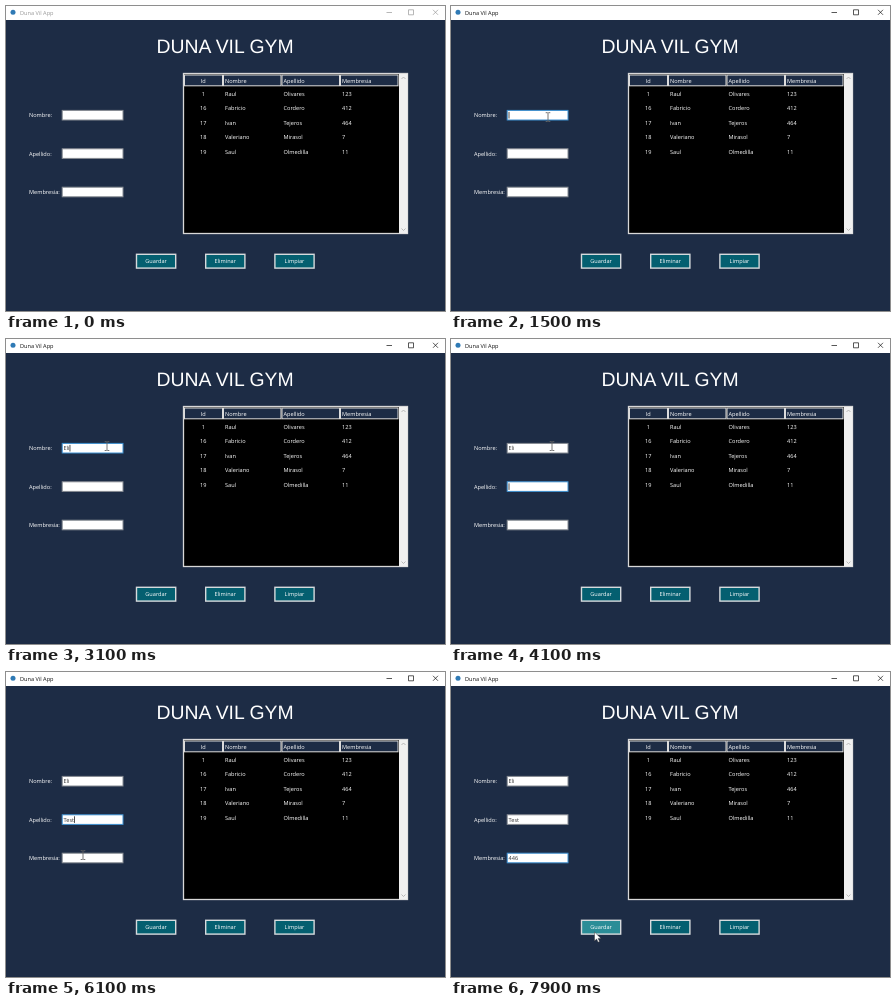
Animation, 439 px wide and 305 px high, one loop 8 s. Source, as an HTML page:

```html
<!DOCTYPE html>
<html lang="es">
<head>
<meta charset="utf-8">
<title>Duna Vil App</title>
<style>
html, body { margin: 0; width: 100%; height: 100%; overflow: hidden; background: #1d2c45; }
svg { display: block; width: 439px; height: 305px; }
text { font: 5.6px "Open Sans", "Noto Sans", sans-serif; fill: #fff; text-rendering: geometricPrecision; white-space: pre; }
.heading { font: 19.4px "Liberation Sans", Arial, sans-serif; }
.mid { text-anchor: middle; }
.chrome text { fill: currentColor; }
.chrome path { fill: none; stroke: currentColor; stroke-width: .7; }
.chrome { color: #999; }
.chrome.active { color: #111; }
.head { fill: #1d2c45; stroke: #dcdcdc; }
.field { fill: #fff; stroke: #858a92; }
.field.focus { stroke: #3c8fd0; }
.value { fill: #333; }
.button { fill: #045f70; stroke: #d6dadd; stroke-width: 1.4; }
.button.hover { fill: #2b8d97; }
</style>
</head>
<body>
<svg id="stage" viewBox="0 0 439 305">
  <rect width="439" height="305" fill="#1d2c45"/>
  <g class="chrome" id="chrome">
    <rect width="439" height="14" fill="#fff"/>
    <circle cx="7" cy="6.3" r="2.5" fill="#2f7ab5"/>
    <text x="14" y="8.6">Duna Vil App</text>
    <path d="M380.5 6.5h5.5M402.5 3.8h5v5h-5zM427 3.8l5 5M432 3.8l-5 5"/>
  </g>
  <text class="heading mid" x="219" y="47.4">DUNA VIL GYM</text>
  <rect x="177.5" y="67.5" width="224" height="160" fill="#000" stroke="#d8d8d8" stroke-width="1.3"/>
  <rect x="393" y="68" width="8.5" height="159.5" fill="#f0f0f0"/>
  <path d="M395.5 73l2-2 2 2M395.5 222.5l2 2 2-2" fill="none" stroke="#aaa" stroke-width=".8"/>
  <g id="ui"></g>
  <path id="caret" d="M0 0v6.6" stroke="#222" stroke-width=".8"/>
  <path id="beam" d="M-2.3 -4.3h1.6l.7 .6.7-.6h1.6M0 -3.7v7.6M-2.3 4.5h1.6l.7-.6.7.6h1.6" fill="none" stroke="#666" stroke-width=".9"/>
  <path id="arrow" d="M0 0v9l2.1-2 1.5 3.2 1.5-.7-1.5-3.1h2.9z" fill="#fff" stroke="#222" stroke-width=".4"/>
</svg>
<script>
const LOOP = 8000, STEP = 100;
const $ = id => document.getElementById(id);
const ui = $('ui');

function add(tag, attrs, content = '') {
  const el = document.createElementNS('http://www.w3.org/2000/svg', tag);
  for (const k in attrs) el.setAttribute(k, attrs[k]);
  el.textContent = content;
  return ui.appendChild(el);
}
const box = (cls, x, y, width, height) => add('rect', { class: cls, x, y, width, height });
const label = (s, x, y, cls = '') => add('text', { x, y, class: cls }, s);

// Table
const columns = [['Id', 178.5, 38], ['Nombre', 217.5, 57.5], ['Apellido', 276, 57.5], ['Membresia', 334.5, 57.5]];
const rows = [
  ['1', 'Raul', 'Olivares', '123'],
  ['16', 'Fabricio', 'Cordero', '412'],
  ['17', 'Ivan', 'Tejeros', '464'],
  ['18', 'Valeriano', 'Mirasol', '7'],
  ['19', 'Saul', 'Olmedilla', '11']
];
columns.forEach(([name, x, w], c) => {
  const put = (s, y) => c ? label(s, x + 1.5, y) : label(s, 197.3, y, 'mid');
  box('head', x, 69, w, 10.8);
  put(name, 76.5);
  rows.forEach((row, r) => put(row[c], 89.6 + r * 14.6));
});

// Form: each key is [time, text]
const fields = [
  { name: 'Nombre:', y: 104.4, keys: [[2700, 'E'], [2900, 'El'], [3100, 'Eli']] },
  { name: 'Apellido:', y: 142.8, keys: [[4600, 'T'], [4700, 'Te'], [4900, 'Tes'], [5000, 'Test']] },
  { name: 'Membresia:', y: 181.2, keys: [[6900, '4'], [7000, '44'], [7100, '446']] }
];
for (const f of fields) {
  label(f.name, 23, f.y + 6.8);
  f.rect = box('field', 56.2, f.y, 60.8, 9.6);
  f.value = label('', 57.6, f.y + 6.8, 'value');
}
const buttons = ['Guardar', 'Eliminar', 'Limpiar'].map((s, i) => {
  const x = 130.5 + i * 69.2;
  const b = box('button', x, 248.3, 39.2, 13.8);
  label(s, x + 19.6, 257.3, 'mid');
  return b;
});

// Pointer path [time, x, y] and focus changes [time, field]
const path = [
  [400, 14, 139], [700, 52, 130], [1000, 92, 113.5], [1300, 96, 113], [1500, 97, 111], [1700, 101, 107],
  [5400, 101, 107], [5700, 74, 142], [5900, 66, 172], [6100, 77, 183], [7400, 77, 183],
  [7500, 75.5, 198], [7600, 92, 225], [7700, 117, 254], [7800, 139, 266], [7900, 143.5, 260]
];
const focusAt = [[1100, 0], [4100, 1], [6200, 2]];
const last = (list, t) => list.filter(k => k[0] <= t).pop();

function pointer(t) {
  const a = last(path, t);
  if (!a) return null;
  const b = path.find(k => k[0] > t) || a;
  const u = b === a ? 0 : (t - a[0]) / (b[0] - a[0]);
  return [a[1] + (b[1] - a[1]) * u, a[2] + (b[2] - a[2]) * u];
}
const inside = (p, r) => {
  const [x, y, w, h] = ['x', 'y', 'width', 'height'].map(k => +r.getAttribute(k));
  return p && p[0] >= x && p[0] <= x + w && p[1] >= y && p[1] <= y + h;
};
function place(el, p, shown) {
  el.style.display = shown ? '' : 'none';
  if (shown) el.setAttribute('transform', `translate(${p})`);
}

function draw(t) {
  const focus = last(focusAt, t), p = pointer(t);
  $('chrome').classList.toggle('active', t >= 1100);
  fields.forEach((f, i) => {
    f.value.textContent = (last(f.keys, t) || [0, ''])[1];
    f.rect.classList.toggle('focus', !!focus && focus[1] === i);
  });
  buttons.forEach(b => b.classList.toggle('hover', !!inside(p, b)));

  // Caret: 600 ms on, 300 ms off
  const on = focus && (t - focus[0]) % 900 < 600;
  if (on) {
    const f = fields[focus[1]];
    place($('caret'), [58 + f.value.getComputedTextLength(), f.y + 1.5], true);
  } else place($('caret'), null, false);

  const overField = fields.some(f => inside(p, f.rect));
  place($('beam'), p, p && overField);
  place($('arrow'), p, p && !overField);
}

const start = performance.now();
function tick() {
  const t = (performance.now() - start) % LOOP;
  draw(Math.floor(t / STEP) * STEP);
  requestAnimationFrame(tick);
}
tick();
</script>
</body>
</html>
```
